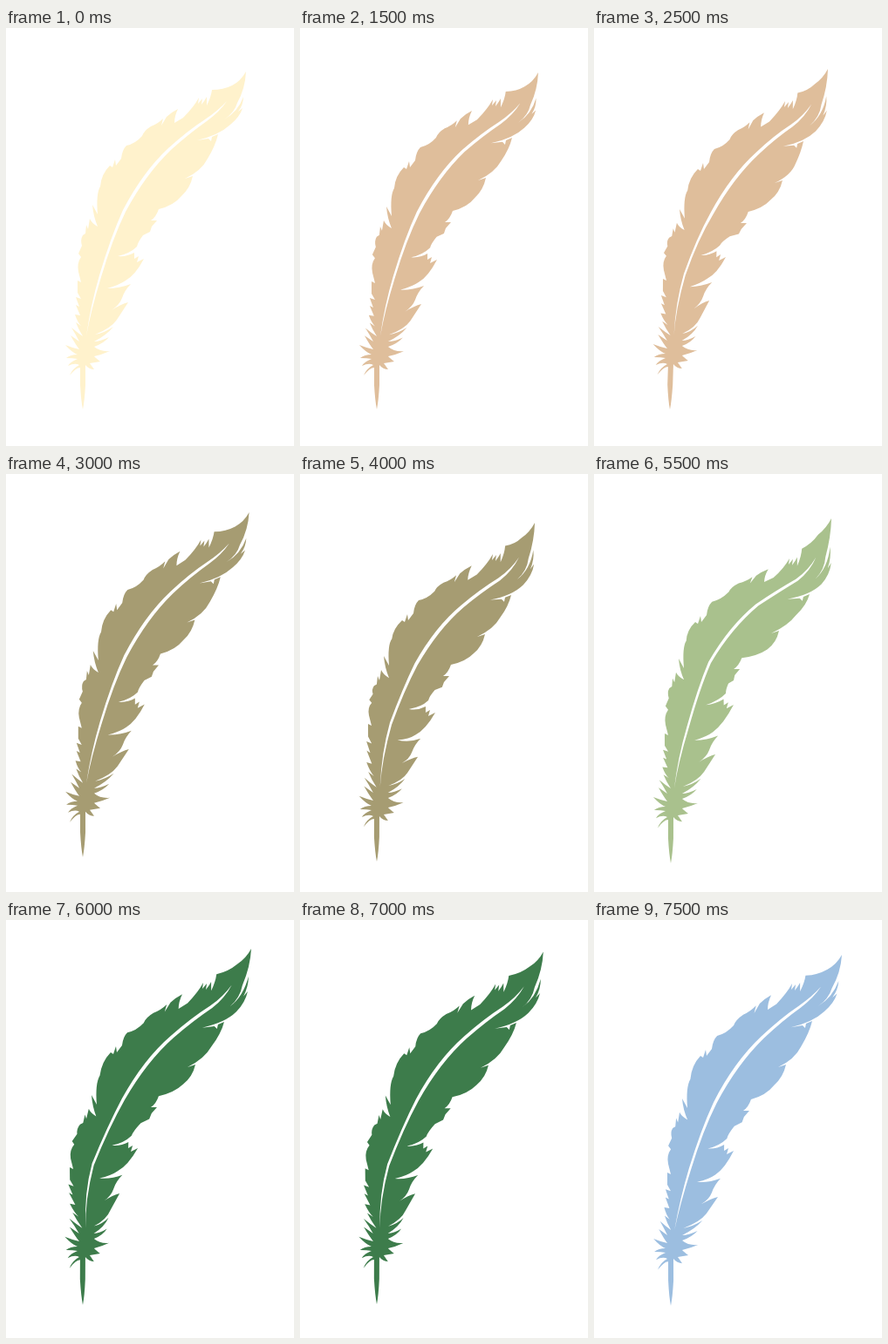
An HTML page with a canvas for the animation above (8000 ms loop, 330x480 px).

```html
<!DOCTYPE html>
<html lang="en">
<head>
<meta charset="utf-8">
<title>Feather</title>
<style>
html, body { margin: 0; width: 100%; height: 100%; overflow: hidden; background: #fff }
canvas { display: block }
</style>
</head>
<body>
<canvas id="stage" width="330" height="480"></canvas>
<script>
const ctx = document.getElementById('stage').getContext('2d');

// Resting outline: left edge downwards, tuft and quill, right edge upwards.
const leftEdge = `M275 50 Q269 61 259 66 Q249 71 236 71 Q235 79 230 89 L230 79
  Q228 83 224 88 L225 81 L220 87 L221 80 Q215 91 203 103 L193 109 Q193 101 197 93
  Q189 97 184 102 L178 112 L180 104 Q174 110 166 113 Q158 118 156 124
  Q148 133 138 135 Q133 140 132 150 L126 158 L125 151 L122 160 L119 158
  Q109 168 108 182 Q103 190 105 214 L99 203 Q100 216 105 228 Q98 224 96 219
  L94 231 L92 226 L91 236 L88 238 Q85 243 87 250 L83 259 L86 263
  Q81 270 83 280 L86 292 L82 290 L82 304 L86 311 L80 309 L84 320 L80 318
  L85 330 L79 329 Q82 338 86 342 L80 338`;
const tuft = `Q83 346 88 354 Q82 350 75 344 Q80 352 84 360 L74 353 Q80 364 84 369
  Q75 367 68 364 Q76 373 82 375 Q74 375 69 379 Q77 379 82 380 Q74 383 71 388
  Q79 384 84 387 Q76 391 73 399 Q80 390 85 390 L85 410 Q86 428 88 438
  Q90 428 91 410 L91 387 Q95 392 101 392 L96 385 L108 383 Q103 379 101 377
  Q110 375 119 371 Q108 372 101 366 Q112 362 118 355 Q108 360 101 360
  Q115 353 123 343 Q113 350 102 352`;
const rightEdge = `Q120 345 127 335 L140 315 Q132 317 121 324 Q130 318 133 310
  Q136 301 143 294 Q130 299 116 299 Q130 295 137 290 Q148 284 158 265
  L150 269 L152 262 L147 265 L147 258 Q138 263 128 262 Q142 259 150 251
  Q151 246 157 238 L165 234 L167 228 L173 221 L166 221 Q172 217 175 208
  Q192 204 201 193 Q211 184 214 170 L205 173 Q224 164 231 150 Q240 135 243 122
  L236 125 L235 130 L232 127 L219 129 Q244 123 257 111 Q268 102 271 92 L266 96
  Q272 88 272 79 Q266 96 250 105 Q262 97 265 86 Q274 70 275 50 Z`;
const shaft = `M92 354 Q97 318 107 284 Q120 240 134 209 Q157 165 186 138
  Q208 118 228 105 Q243 95 253 84 Q245 96 230 107 Q210 121 189 140
  Q160 168 137 211 Q122 242 109 286 Q97 325 92 354 Z`;
const outline = leftEdge + tuft + rightEdge;

// Landmarks: tip, upper left, left edge down, right edge down, tuft, quill end.
const anchors = [[275, 51], [216, 83], [124, 153], [99, 204], [82, 290], [243, 122],
  [214, 170], [172, 221], [158, 266], [141, 305], [92, 375], [88, 437]];

// How far each landmark moves in a pose: x, y pairs in the order above.
const poses = {
  calm:  [-2, 1, 0, 2, 0, 2, 0, 2, 0, 1, 0, 4, -1, 2, 0, 2, -1, 1, -1, 2, 0, 0, 0, 0],
  lean:  [-7, -3, -2, 4, 0, 4, -1, 5, -3, -2, -3, 8, 2, 5, 2, 3, -7, -2, -8, -2, 0, -1, -1, 0],
  sag:   [-6, 6, 0, 12, -2, 10, -3, 6, -4, -3, -1, 17, -2, 14, -2, 11, -3, 9, -5, 10, 0, 6, 0, 7],
  curl:  [-3, 1, 3, 17, -3, 12, -2, 9, -1, 8, 4, 16, -2, 10, -6, 3, 2, 0, -1, 7, 0, 7, 0, 9],
  reach: [6, -17, 5, -8, 1, -6, -1, -2, -9, -6, 7, -5, 3, -4, 0, -6, -7, -3, -10, -1, 0, 0, 0, 4],
  lift:  [9, -10, 6, -7, 3, -2, 2, 2, 2, 0, 7, -6, 6, -4, 5, -2, 2, 0, 2, 3, 0, 2, 0, 5]
};

// One entry per step: pose, strength, extra sway at the tip.
const steps = [
  ['calm', 0, 0, 0], ['reach', .7, 1, -1], ['calm', .7, 0, 1],
  ['calm', 1, 0, 0], ['lean', .5, 3, -4], ['lean', 1, 0, 0],
  ['lift', .4, 0, -2], ['sag', .5, 1, -3], ['sag', 1, 0, 0],
  ['reach', .8, -3, -2], ['lift', .8, -1, 1], ['curl', 1, 0, 0],
  ['reach', 1, 0, 0], ['lift', .5, -1, -1], ['reach', .8, -1, 0],
  ['lift', 1, 0, 0]
];
const colors = ['#fff2cc', '#dfbe9b', '#a69c72', '#a9c18d', '#3d7c4b', '#9cbee0'];
const stepTime = 500;

function warp(path, [name, amount, swayX, swayY]) {
  const moves = poses[name];
  return new Path2D(path.replace(/(\d+) (\d+)/g, (_, px, py) => {
    let x = 0, y = 0, sum = 0;
    anchors.forEach(([ax, ay], i) => {
      const weight = ((px - ax) ** 2 + (py - ay) ** 2 + 60) ** -1.5;
      x += weight * moves[2 * i];
      y += weight * moves[2 * i + 1];
      sum += weight;
    });
    const height = ((437 - py) / 387) ** 2;
    x = +px + amount * x / sum + swayX * height;
    y = +py + amount * y / sum + swayY * height;
    return x.toFixed(2) + ' ' + y.toFixed(2);
  }));
}

const drawings = steps.map((step, i) => ({
  color: colors[Math.floor(i / 3)],
  body: warp(outline, step),
  shaft: warp(shaft, step)
}));

function draw(now) {
  const { color, body, shaft } = drawings[Math.floor(now / stepTime) % steps.length];
  ctx.fillStyle = '#fff';
  ctx.fillRect(0, 0, 330, 480);
  ctx.fillStyle = color;
  ctx.fill(body);
  ctx.fillStyle = '#fff';
  ctx.fill(shaft);
}

const start = performance.now();
function tick() {
  draw(performance.now() - start);
  requestAnimationFrame(tick);
}
tick();
</script>
</body>
</html>
```
